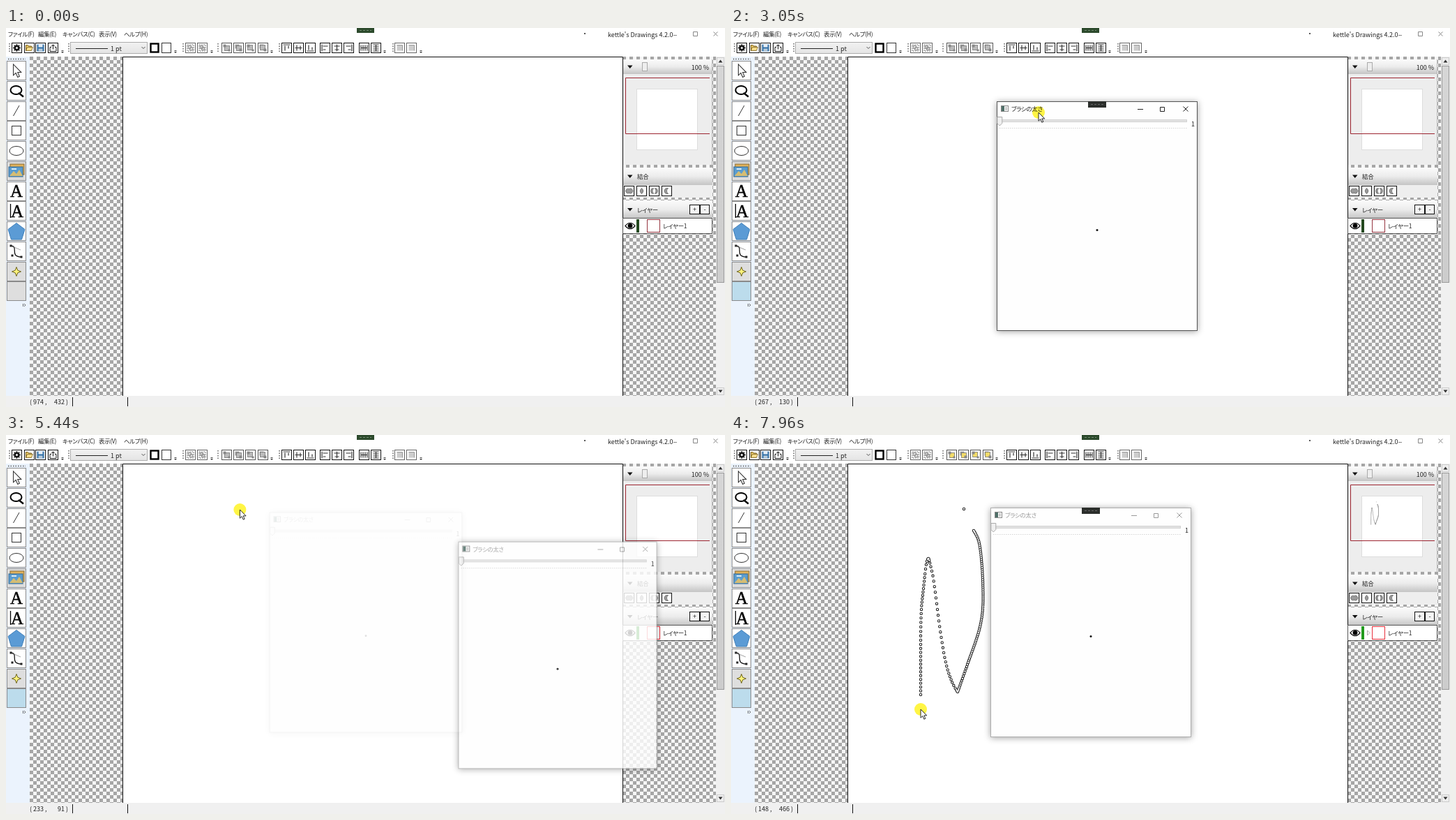
An HTML page for the animation above (8 s loop, 1031 px wide and 543 px high).

```html
<!DOCTYPE html>
<html lang="ja">
<head>
<meta charset="utf-8">
<title>Drawing tool</title>
<style>
  html, body { margin: 0; width: 100%; height: 100%; overflow: hidden; background: #fff; }
  svg { display: block; width: 100vw; height: 100vh; }
  text { font: 9px "Noto Sans CJK JP", "Noto Sans CJK", "Noto Sans", sans-serif; fill: #222; }
  .ja { font-size: 8.5px; font-feature-settings: "palt"; letter-spacing: -.35px; }
  .serif { font: 25px "Liberation Serif", serif; fill: #000; stroke: #000; stroke-width: .5; }
  .dialog { filter: drop-shadow(0 1px 5px rgba(0, 0, 0, .38)); color: #222; }
  .dialog.idle { color: #999; }
  .dialog .title { fill: currentColor; }
  #halo { mix-blend-mode: multiply; }
</style>
</head>
<body>
<svg id="stage" viewBox="0 0 1031 543" xmlns="http://www.w3.org/2000/svg"></svg>
<script>
const rect = (x, y, w, h, fill, more = '') =>
  `<rect x="${x}" y="${y}" width="${w}" height="${h}" fill="${fill}" ${more}/>`;
const box = (x, y, w, h, fill, stroke = '#111', sw = 1, more = '') =>
  rect(x + .5, y + .5, w - 1, h - 1, fill, `stroke="${stroke}" stroke-width="${sw}" ${more}`);
const path = (d, stroke = '#111', fill = 'none', sw = 1, more = '') =>
  `<path d="${d}" fill="${fill}" stroke="${stroke}" stroke-width="${sw}" ${more}/>`;
const text = (x, y, s, cls = '', more = '') =>
  `<text x="${x}" y="${y}" class="${cls}" xml:space="preserve" ${more}>${s}</text>`;
const group = (attrs, ...parts) => `<g ${attrs}>${parts.join('')}</g>`;
const each = (list, fn) => list.map(fn).join('');

const arrow = 'M0 0V12.2L2.8 9.6L4.8 14.2L6.8 13.3L4.8 8.9H8.7Z';

function menuBar() {
  const items = [[3, 'ファイル(F)'], [46, '編集(E)'], [81, 'キャンバス(C)'], [133, '表示(V)'], [169, 'ヘルプ(H)']];
  return each(items, ([x, s]) => text(x, 12, s, 'ja')) +
    rect(829, 7, 2, 2, '#555') + text(863, 12.5, "kettle's Drawings 4.2.0") +
    path('M957 10.5h5M985.5 5.5h6v6h-6zM1014.5 5.5l6 6M1020.5 5.5l-6 6', '#888') +
    rect(503, 0, 25, 7, '#2c4a2c') + path('M507 3.5h17', '#6f8a6f', 'none', 1, 'stroke-dasharray="3 2"');
}

const grip = x => path(`M${x} 22v14`, '#666', 'none', 1.5, 'stroke-dasharray="1.5 2"');
const more = x => path(`M${x - 1.5} 32.5h3`, '#444') + path(`M${x - 2} 34h4l-2 2z`, 'none', '#333');
const icon = (x, body, edge = '#111') =>
  box(x - 7, 21, 15, 15, '#fff', edge) + group(`transform="translate(${x + .5} 28.5)"`, body);

function toolBar() {
  const bars = {
    402: 'M-5 -4.5h10M-2.5 -3v7M2.5 -3v4', 419: 'M-5 0h10M-2.5 -4v8M2.5 -3v6', 436: 'M-5 4.5h10M-2.5 -4v7M2.5 -1v4',
    457: 'M-4.5 -5v10M-3 -2.5h7M-3 2.5h4', 474: 'M0 -5v10M-4 -2.5h8M-3 2.5h6', 491: 'M4.5 -5v10M-4 -2.5h7M-1 2.5h4',
    513: 'M-4.5 -4v8M4.5 -4v8M-1.5 -4v8M1.5 -4v8M-4 0h8', 530: 'M-4 -4.5h8M-4 4.5h8M-4 -1.5h8M-4 1.5h8M0 -4v8'
  };
  const gear = '<circle r="3" fill="none" stroke="#111" stroke-width="2"/>' +
    path('M0 -5.5v11M-5.5 0h11M-3.8 -3.8l7.6 7.6M3.8 -3.8l-7.6 7.6', '#111', 'none', 1.3) + '<circle r="1.5" fill="#fff"/>';
  const order = (x, i) => icon(x,
    (i % 2 ? rect(-5, -5, 6, 6, '#999') : '') +
    rect(i > 1 ? -4 : -3, i > 1 ? -4 : -3, 7, 7, '#bbb', 'class="order" stroke="#777" stroke-width=".8"') +
    (i % 2 ? rect(1, 1, 4, 4, '#888') : rect(-5, -5, 4, 4, '#888') + rect(2, 2, 3, 3, '#888')), '#555');
  return each([5, 90, 254, 304, 392, 555], grip) + each([81, 243, 295, 381, 543, 595], more) +
    icon(15, gear) +
    icon(33, path('M-5 4V-4h3l1 1.5h4V-1', '#7a6020', '#e8c765') + path('M-5 4l2-5h8l-2 5z', '#7a6020', '#f6dc8a', .8)) +
    icon(49, rect(-5, -5, 10, 10, '#2f6ea5') + rect(-3, -5, 6, 4, '#e7eef5') + rect(-3, 1, 6, 4, '#b8cad9')) +
    icon(67, path('M-2.5 -1H-4.5V5H4.5V-1H2.5M0 2V-4.5M-2.5 -2.2L0 -4.7L2.5 -2.2')) +
    box(92, 20, 111, 17, 'url(#combo)', '#acacac') + path('M100 29.5h46', '#222') + text(150, 32.5, '1 pt') +
    path('M194.5 27l2.5 2.5l2.5 -2.5', '#555') +
    box(207, 22, 12, 13, '#fff', '#000', 2.4) + box(223, 21, 14, 15, '#fff', '#333') +
    each([264, 281], (x, i) => icon(x, path('M-4.5 -4.5h9v9h-9z', '#777', 'none', 1, 'stroke-dasharray="2 1"') +
      path('M-3 -3h4v4h-4zM-1 -1h4v4h-4z', '#888', i ? '#ddd' : 'none'), '#666')) +
    each([316, 333, 350, 368], order) +
    each(Object.entries(bars), ([x, d]) => icon(+x, path(d, '#333', 'none', 1.2))) +
    each([564, 581], x => icon(x, rect(-4, -4, 8, 8, '#ccc') + path('M-4 -4h8v8', '#999'), '#666'));
}

function toolBox() {
  const cell = i => {
    const grey = [5, 10, 11].includes(i);
    return box(1, Math.round(47 + i * 28.75), 28, 28, grey ? '#dedede' : '#fff', '#8a8a8a', 1, i === 11 ? 'id="brush"' : '');
  };
  return rect(0, 41, 34, 486, '#ebf3fd') +
    path('M3 44.5h25', '#555', 'none', 1.5, 'stroke-dasharray="1.5 2"') + each([...Array(12).keys()], cell) +
    path(arrow, '#333', '#fff', .8, 'transform="translate(10.5 52) scale(1.3)"') +
    '<ellipse cx="14.5" cy="89" rx="8" ry="6" fill="none" stroke="#000" stroke-width="2"/>' +
    path('M18 93l7 5.5', '#000', 'none', 2.4) + path('M10.5 126L19 111', '#333') + box(8, 140, 14, 14, '#fff', '#333') +
    '<ellipse cx="15" cy="176" rx="10" ry="6.5" fill="none" stroke="#333"/>' +
    rect(6, 195, 20, 15, '#e0b25c', 'stroke="#8a6a30"') + rect(4, 199, 20, 14, '#5b9dd0', 'stroke="#376a92"') +
    path('M5 212l6-7l4 4l4-6l5 9z', 'none', '#d5bd73') + rect(8, 201, 7, 2, '#d7ecf8') +
    text(6, 242, 'A', 'serif') + text(7, 271, 'A', 'serif') + path('M6.5 252v20', '#000', 'none', 1.3) +
    path('M15 279.5L27 288.5L22.5 303H7.5L3 288.5Z', '#4180b8', '#5b9bd5') +
    path('M7 312C19 313 4 327 22 328', '#111', 'none', 1.3) + path('M7 312L21 318', '#777', 'none', .7) +
    each([[7, 312], [22, 328], [9, 326]], ([x, y]) => rect(x - 1.5, y - 1.5, 3, 3, '#222')) +
    path('M15 342.5L16.8 347.2L21.5 349L16.8 350.8L15 355.5L13.2 350.8L8.5 349L13.2 347.2Z', '#6d6420', '#fff27a') +
    path('M24.5 395v4M26 395l2 2l-2 2', '#444', 'none', .8);
}

function sidePanel() {
  const head = (y, h, label) => rect(885, y, 128, h, 'url(#head)') +
    path(`M891 ${y + h / 2 - 2}h7.5l-3.75 4.5z`, 'none', '#111') + text(905, y + h / 2 + 3.5, label, 'ja');
  const merge = ['M-5 0a3.5 3.5 0 0 1 5-3a3.5 3.5 0 1 1 0 6a3.5 3.5 0 0 1-5-3z', 'M0 -4q4.5 4 0 8q-4.5-4 0-8z',
    'M-1 -4a4 4 0 0 0 0 8q-3-4 0-8zM1 -4a4 4 0 0 1 0 8q3-4 0-8z', 'M2 -4a4.2 4.2 0 1 0 0 8q-4-4 0-8z'];
  return rect(885, 45, 128, 151, '#ededed') + head(45, 21, '') +
    box(912, 49, 8, 13, '#eee', '#aaa') + text(1008, 59.5, '100 %', '', 'text-anchor="end"') +
    box(904, 87, 88, 88, '#fff', '#ddd') + path('', '#999', 'none', .8, 'id="mini" stroke-linecap="round"') +
    path('M1009 71.5H888.5V151.5H1009', '#9c2430') + path('M1012.5 45v151', '#bbb') +
    head(200, 25, '結合') + rect(885, 225, 128, 18, '#eee') +
    each(merge, (d, i) => box(886 + 18 * i, 226, 15, 15, '#fff') +
      path(d, '#666', '#999', .8, `transform="translate(${893.5 + 18 * i} 233.5)"`)) +
    head(247, 26, 'レイヤー') + box(980, 253, 15, 14, '#f4f4f4') + box(995, 253, 14, 14, '#f4f4f4') +
    text(987.5, 263, '+', '', 'text-anchor="middle"') + text(1002, 263, '-', '', 'text-anchor="middle"') +
    box(884, 272, 129, 23, '#fff', '#555') +
    path('M888 283.5q7-8.5 14 0q-7 8.5-14 0z', '#111', '#fff', 1.2) + '<circle cx="895" cy="283.3" r="3.4"/>' +
    rect(904, 274, 4, 19, '#24491f', 'id="bar"') + box(919, 274, 19, 19, '#fff', '#96343f', 1, 'id="thumb"') +
    path('M912.5 280l3.5 3.5l-3.5 3.5z', '#999', '#fff', .8, 'id="expand"') + text(942, 286.5, 'レイヤー1', 'ja');
}

const frame = () =>
  rect(34, 41, 984, 486, 'url(#check)') + rect(167, 41, 718, 486, '#fff') + path('M167.5 527V41.5H884.5V527') +
  rect(1018, 41, 13, 486, '#f0f0f0') + box(1019, 54, 11, 311, 'url(#thumbFill)', '#9a9a9a') +
  box(1019, 42, 11, 11, '#eee', '#ccc') + box(1019, 515, 11, 11, '#eee', '#ccc') +
  path('M1021.5 49.5h6l-3-4z', 'none', '#333') + path('M1021.5 518.5h6l-3 4z', 'none', '#333') +
  rect(0, 527, 1031, 16, '#f0f0f0') + path('M95.5 529v13M174.5 529v13') +
  text(34, 538.5, '', '', 'id="sx"') + text(84, 538.5, '', '', 'id="sy" text-anchor="end"') + text(86, 538.5, ')');

const dialog = id => group(`id="${id}" class="dialog"`,
  box(0, 0, 288, 329, '#fefefe', 'currentColor', 1, 'stroke-opacity=".75"'),
  box(6, 6, 11, 9, '#fff', '#888'), rect(7, 7, 4, 7, '#4f6f68'), rect(12, 8, 3, 5, '#ccc'),
  text(21, 14.3, 'ブラシの太さ', 'title ja'),
  path('M202 11.5h8M234.5 8.5h6v6h-6zM267.5 7.5l7 7M274.5 7.5l-7 7', 'currentColor'),
  box(5, 26, 268, 4, '#e3e3e3', '#d2d2d2'), path('M4 38.5h269', '#d5d5d5', 'none', 1, 'stroke-dasharray="1.5 1.5"'),
  path('M.8 22.5h7v9l-3.5 3.5l-3.5-3.5z', '#aaa', '#f0f0f0'), text(279, 35.5, '1'),
  '<circle cx="144" cy="184.5" r="1.5" fill="#111"/>',
  group('class="badge"', rect(131, 0, 26, 9, '#2b2e2b'), path('M135 4.5h18', '#666', 'none', 1, 'stroke-dasharray="3 2"')));

const fade = (id, ...stops) => `<linearGradient id="${id}" x2="0" y2="1">` +
  each(stops, (c, i) => `<stop offset="${i / (stops.length - 1)}" stop-color="${c}"/>`) + '</linearGradient>';

document.getElementById('stage').innerHTML =
  `<defs>${fade('head', '#fbfbfb', '#ececec', '#c4c4c4')}${fade('combo', '#f2f2f2', '#e4e4e4')}${fade('thumbFill', '#d6d6d6', '#cccccc')}
  <pattern id="check" width="10" height="10" x="34" y="41" patternUnits="userSpaceOnUse">
  ${rect(0, 0, 10, 10, '#f6f6f6') + rect(0, 0, 5, 5, '#a6a6a6') + rect(5, 5, 5, 5, '#a6a6a6')}</pattern></defs>` +
  rect(0, 0, 1031, 543, '#fff') + menuBar() + toolBar() + frame() + toolBox() + sidePanel() +
  path('', '#222', 'none', 4.4, 'id="ink" stroke-linecap="round"') +
  path('', '#fff', 'none', 2.3, 'id="core" stroke-linecap="round"') +
  dialog('first') + dialog('second') +
  '<circle id="halo" r="9" fill="#fff545"/>' + path(arrow, '#111', '#fff', .9, 'id="cursor"');

const $ = id => document.getElementById(id);
const clamp = v => Math.max(0, Math.min(1, v));

// time, x, y
const pointerKeys = [
  [330, 811, 338], [560, 560, 385], [800, 290, 405], [985, 161, 406.5], [1100, 24, 380], [1240, 20, 376],
  [1660, 20, 376], [1800, 40, 362], [2000, 130, 296], [2250, 260, 197], [2500, 361.3, 136.5], [2640, 410, 124],
  [2710, 427, 121], [2980, 432, 120], [3050, 441, 121], [3400, 704, 167], [3870, 704, 167], [4100, 590, 146],
  [4300, 440, 118], [4570, 345, 108], [4700, 336, 107], [4900, 336, 107], [4970, 335.4, 107], [5650, 335.4, 107],
  [5900, 343, 125], [6070, 348, 137], [6190, 348, 137], [6270, 355.5, 153], [6400, 360, 190], [6560, 361.5, 235],
  [6700, 357, 275], [6890, 340, 326], [7050, 325, 368], [7085, 325, 368], [7150, 317, 354], [7230, 308, 326],
  [7320, 300, 280], [7450, 290, 205], [7500, 285, 183], [7540, 283, 177], [7580, 280, 185], [7650, 276, 220],
  [7710, 273, 250], [7790, 272, 300], [7920, 272, 372], [7960, 272, 393]
];
const dialogKeys = [[2980, 372, 104], [3050, 381, 105], [3400, 647, 151]];

// Smooth interpolation that never overshoots a key.
function along(keys, t) {
  const last = keys.length - 1;
  if (t <= keys[0][0]) return keys[0].slice(1);
  if (t >= keys[last][0]) return keys[last].slice(1);
  const i = keys.findIndex(k => k[0] > t) - 1;
  const span = keys[i + 1][0] - keys[i][0], u = (t - keys[i][0]) / span;
  const slope = (j, a) => {
    const p = keys[Math.max(j - 1, 0)], k = keys[j], n = keys[Math.min(j + 1, last)];
    return (k[a] - p[a]) * (n[a] - k[a]) <= 0 ? 0 : (n[a] - p[a]) / (n[0] - p[0]);
  };
  return [1, 2].map(a => {
    const p = keys[i][a], q = keys[i + 1][a], v = 1 - u;
    return p * v * v * (1 + 2 * u) + q * u * u * (3 - 2 * u) +
      span * u * v * (slope(i, a) * v - slope(i + 1, a) * u);
  });
}

const pointer = t => along(pointerKeys, t);
const within = (t, spans) => spans.find(([a, b]) => t >= a && t < b);

const pressed = [[1310, 1460], [2980, 3600], [5370, 5580], [6200, 8000]];
const offCanvas = [[985, 2070], [2500, 4020]];
// start of a run and the number of 70 ms steps in it
const runs = [[0, 0], [330, 17], [1660, 15], [2980, 6], [3600, 1], [3870, 10], [4630, 1], [4900, 1], [5370, 10], [6270, 23], [7960, 0]];

function stepTime(t) {
  const [start, count] = runs.filter(r => r[0] <= t).pop();
  return start + 70 * Math.min(count, Math.floor((t - start) / 70));
}

function dotsAt(t) {
  const dots = t >= 5510 ? [[334, 106]] : [];
  if (t >= 6270)
    for (let s = 6190; s <= t - 40; s += s > 7110 && s < 7600 ? 14 : 10) dots.push(pointer(s));
  return dots;
}
const dotPath = dots => dots.map(([x, y]) => `M${x.toFixed(1)} ${y.toFixed(1)}h0.01`).join('');

function place(id, [x, y], opacity, scale) {
  const g = $(id);
  g.setAttribute('transform', `translate(${x + 144 * (1 - scale)} ${y + 164.5 * (1 - scale)}) scale(${scale})`);
  g.style.opacity = opacity;
  g.style.display = opacity > 0 ? '' : 'none';
  g.querySelector('.badge').style.display = opacity < 1 ? 'none' : '';
}

function open(id, t, start, at) {
  const u = clamp((t - start) / 200);
  place(id, at, t < start ? 0 : .12 + .88 * u, .96 + .04 * u * (2 - u));
}

function draw(now) {
  const t = stepTime(now % 8000);
  const [x, y] = pointer(t);
  for (const id of ['cursor', 'halo']) $(id).setAttribute('transform', `translate(${x} ${y})`);
  $('cursor').style.display = t < 330 ? 'none' : '';
  $('halo').style.display = within(t, pressed) ? '' : 'none';

  const off = within(t, offCanvas);
  const [px, py] = pointer(off ? off[0] : t - 15);
  const sx = t < 330 ? 974 : Math.max(0, Math.round((px - 161) * 4 / 3));
  $('sx').textContent = `( ${sx} ,`;
  $('sy').textContent = t < 330 ? 432 : Math.round((py - 39) * 4 / 3);

  $('brush').setAttribute('fill', t < 1100 ? '#dedede' : within(t, pressed.slice(0, 1)) ? '#b0d3e4' : '#bcdcec');

  if (t < 5370) open('first', t, 1660, along(dialogKeys, t));
  else {
    const u = clamp((t - 5370) / 210);
    place('first', [647, 151], 1 - u ** 1.6, 1 - .03 * u);
  }
  open('second', t, 5440, [372, 104]);
  $('first').classList.toggle('idle', t >= 5370);
  $('second').classList.add('idle');

  const drawn = t >= 5510, chosen = t >= 5370;
  document.querySelectorAll('.order').forEach(e => e.setAttribute('fill', drawn ? '#f3dc6a' : '#bbb'));
  $('bar').setAttribute('fill', chosen ? '#219a1c' : '#24491f');
  $('thumb').setAttribute('stroke', chosen ? '#e8303c' : '#96343f');
  $('expand').style.display = drawn ? '' : 'none';

  const dots = dotsAt(t), d = dotPath(dots);
  $('ink').setAttribute('d', d);
  $('core').setAttribute('d', d);
  $('mini').setAttribute('d', dotPath(dots.map(([a, b]) => [905 + (a - 167) * .1213, 88 + (b - 41) * .1213])));
}

const begin = performance.now();
function tick() {
  draw(performance.now() - begin);
  requestAnimationFrame(tick);
}
tick();
</script>
</body>
</html>
```
